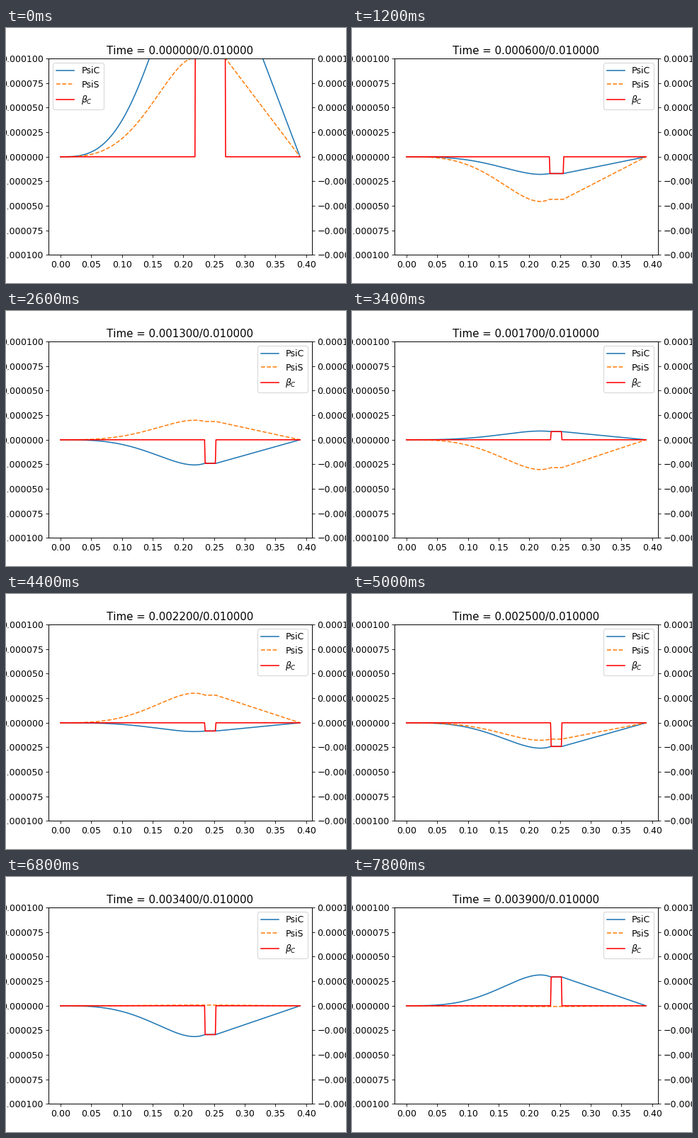
Write a matplotlib script that moves like this. It is 480 px wide and 360 px high and loops after 8 s.

```python
import numpy as np
import matplotlib.pyplot as plt
from matplotlib.animation import FuncAnimation

plt.rcParams.update({"font.size": 12, "text.kerning_factor": 6})

FRAMES, INTERVAL = 40, 200
DT, T_END = 1e-4, 0.01
R_MAX, R_PEAK, MID = 0.39, 0.218, 0.244
LIMIT = 1e-4

x = np.linspace(0, R_MAX, 400)


def rise(r):
    return 1 - (1 - (r / R_PEAK) ** 3) ** 2


def profile(n):
    """Normalised flux profile and the mask of its flat section."""
    half = 0.0088 + 0.0155 * 0.74 ** n
    lo, hi = MID - half, MID + half
    flat = (x >= lo) & (x <= hi)
    level = rise(lo)
    tail = level * (R_MAX - x) / (R_MAX - hi)
    return np.where(x < lo, rise(x), np.where(flat, level, tail)), flat


def amplitudes(n):
    """Cosine and sine parts: a steady rotation plus a decaying start-up."""
    size = 31.4e-6 + 193.3e-6 * 0.67 ** n
    phase = np.radians(36 * (n - 9) - 1.4 - 8 * 0.8 ** n)
    return size * np.cos(phase), size * np.sin(phase)


fig, ax = plt.subplots(figsize=(6.4, 4.8), dpi=75)
twin = ax.twinx()
psi_c, = ax.plot(x, 0 * x, label="PsiC")
psi_s, = ax.plot(x, 0 * x, "--", label="PsiS")
beta, = ax.plot(x, 0 * x, "r", label=r"$\beta_C$")
ax.set_xlim(-0.05 * R_MAX, 1.05 * R_MAX)
for a in (ax, twin):
    a.set_ylim(-LIMIT, LIMIT)
ax.legend(loc="best")
title = ax.set_title("")


def update(n):
    shape, flat = profile(n)
    c, s = amplitudes(n)
    psi_c.set_ydata(c * shape)
    psi_s.set_ydata(s * shape)
    beta.set_ydata(np.where(flat, c * shape, 0))
    title.set_text(f"Time = {n * DT:.6f}/{T_END:.6f}")
    return psi_c, psi_s, beta, title


anim = FuncAnimation(fig, update, frames=FRAMES, interval=INTERVAL,
                     repeat=True, repeat_delay=0)
plt.show()
```
